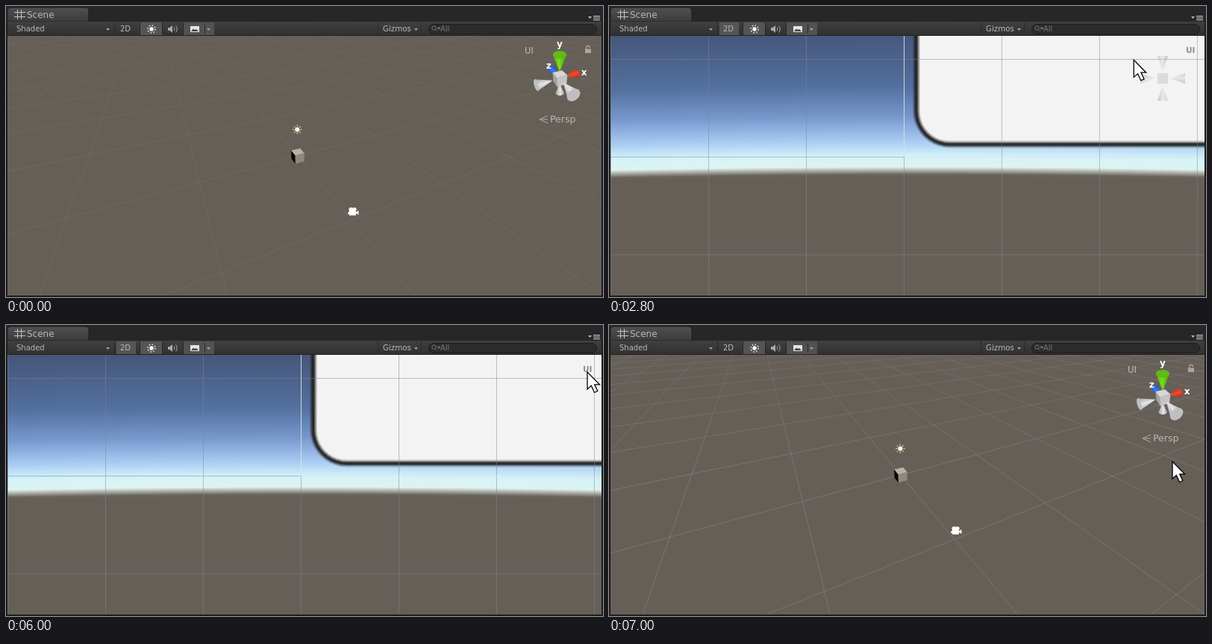
Animation of 800 by 390 pixels, one loop 7.1 s. Source, as an HTML page with a canvas:

```html
<!DOCTYPE html>
<html lang="en">
<head>
<meta charset="utf-8">
<title>Scene view</title>
<style>
html, body { margin: 0; width: 100%; height: 100%; overflow: hidden; background: #1e1e1e; }
#stage { position: relative; width: 800px; height: 390px; overflow: hidden; }
canvas, svg { position: absolute; left: 0; top: 0; display: block; }
text { font-family: "DejaVu Sans", Verdana, sans-serif; font-size: 10px; fill: #b8b8b8; }
.axis { font-size: 12px; font-weight: bold; fill: #fff; text-anchor: middle; }
</style>
</head>
<body>
<div id="stage">
<canvas id="view" width="800" height="390"></canvas>
<svg width="800" height="390" viewBox="0 0 800 390">
  <defs>
    <linearGradient id="bar" x2="0" y2="1"><stop stop-color="#404040"/><stop offset="1" stop-color="#303030"/></linearGradient>
    <linearGradient id="tab" x2="0" y2="1"><stop stop-color="#505050"/><stop offset="1" stop-color="#3c3c3c"/></linearGradient>
  </defs>
  <path d="M0 0H800V390H0ZM2 40V388H798V40Z" fill="#1e1e1e" fill-rule="evenodd"/>
  <rect width="800" height="21" fill="#272727"/>
  <path d="M2 21V6Q2 2 6 2H106Q111 2 111 7V21Z" fill="url(#tab)" stroke="#1c1c1c"/>
  <rect x="2" y="21" width="796" height="19" fill="url(#bar)"/>
  <path d="M2 39.5H798" stroke="#222"/>
  <path d="M15.500 5V18M20.500 5V18M11 8.500H26M11 14.500H26" stroke="#c4c4c4"/>
  <text x="28" y="16" style="font-size:12px">Scene</text>
  <path d="M780 14H785L782.500 17ZM787 13H796V14.300H787ZM787 15.500H796V16.800H787ZM787 18H796V19.300H787Z" fill="#bbb"/>
  <g id="flat"><rect x="148" y="22" width="26" height="17" fill="#555"/></g>
  <rect x="180" y="22" width="29" height="17" fill="#555"/>
  <rect x="238" y="22" width="41" height="17" fill="#525252"/>
  <path d="M145.500 22V39M179.500 22V39M209.500 22V39M237.500 22V39M266.500 24V37M498.500 22V39M556.500 22V39" stroke="#282828"/>
  <text x="14" y="34">Shaded</text>
  <text x="153" y="34">2D</text>
  <text x="505" y="34" style="font-size:10.300px">Gizmos</text>
  <path d="M134 30H139L136.500 33ZM547 30H552L549.500 33ZM269 30H274L271.500 33Z" fill="#a4a4a4"/>
  <circle cx="195" cy="31" r="2.700" fill="#fff"/>
  <circle cx="195" cy="31" r="5" fill="none" stroke="#ddd" stroke-width="1.800" stroke-dasharray="1.500 2.430"/>
  <path d="M217 29H219.500L223 26V36L219.500 33H217Z" fill="#aaa"/>
  <path d="M225 28.500Q227 31 225 33.500M227.500 26.500Q231 31 227.500 35.500" fill="none" stroke="#aaa"/>
  <rect x="247" y="27" width="12" height="8" fill="#e4e4e4"/>
  <path d="M248 34L251 30.500L253 32L255 31L258 34Z" fill="#444"/>
  <rect x="566.500" y="24.500" width="225" height="13" rx="6.500" fill="#2b2b2b" stroke="#1d1d1d"/>
  <circle cx="573.500" cy="29.500" r="2.700" fill="none" stroke="#777"/>
  <path d="M575.500 31.500L578 34M578 29H582L580 31.500Z" fill="#777" stroke="#777" stroke-width=".8"/>
  <text x="582" y="34" style="fill:#777">All</text>

  <text id="ax" class="axis">x</text>
  <text id="ay" class="axis">y</text>
  <text id="az" class="axis">z</text>
  <g id="persp">
    <text x="695" y="64" style="font-size:11.500px;fill:#c0bcb8">UI</text>
    <path d="M777.500 58V56Q778 53.500 780 53.500Q782 53.500 782.500 56" fill="none" stroke="#aaa6a2" stroke-width="1.300"/>
    <rect x="776" y="57.500" width="8" height="5.500" fill="#aaa6a2"/>
    <path d="M726 147L715 152L726 157M715 152H726" fill="none" stroke="#b0aba7"/>
    <text x="729" y="156" style="font-size:12.500px;fill:#bdb8b4">Persp</text>
  </g>
  <text id="ui2d" x="773" y="63" style="font-size:10.500px;font-weight:bold;fill:#8c8c8c">UI</text>
  <path id="cursor" d="M0 0V23L5.300 18.300L9.500 27.500L13.800 25.500L9.700 16.800H16.500Z" fill="#fff" stroke="#000" stroke-width="1.300"/>
</svg>
</div>
<script>
const LOOP = 7100, STEP = 100, SWING = 500, TO_2D = 2440, TO_3D = 6150;
const YAW = 26 * Math.PI / 180, PITCH = 36 * Math.PI / 180, DIST = 27.2;
const ctx = document.getElementById('view').getContext('2d');
const el = id => document.getElementById(id);
const clamp = (v, a = 0, b = 1) => Math.min(b, Math.max(a, v));
const mix = (a, b, p) => a + (b - a) * p;
const easeOut = p => 1 - (1 - clamp(p)) ** 4;

// time, x, y
const cursorPath = [
  [400, 800, 330], [800, 746, 181], [900, 746, 181], [1300, 701, 64], [2700, 701, 63],
  [3400, 742, 233], [4100, 742, 235], [4800, 779, 63], [6700, 779, 63], [7000, 755, 183]
];
// offset from the horizon, colour
const skyStops = [
  [-190, '#445476'], [-110, '#53709f'], [-70, '#7898cd'], [-38, '#a9cbf2'],
  [-18, '#d3f3f9'], [-4, '#dff3ef'], [1, '#a9aba4'], [6, '#6b645e'], [10, '#665f58']
];

let cam;

function setCamera(k) {
  const a = YAW * k, b = PITCH * k;
  cam = {
    k, w: Math.min(1, k * 1.6), s: mix(13.1, 12.6, k),
    c1: Math.cos(a), s1: Math.sin(a), c2: Math.cos(b), s2: Math.sin(b)
  };
}

function turn([x, y, z]) {
  const { c1, s1, c2, s2 } = cam;
  return [x * c1 - z * s1, x * s1 * s2 + y * c2 + z * c1 * s2, x * s1 * c2 - y * s2 + z * c1 * c2];
}

const near = v => 1 + cam.w * turn(v)[2] / DIST;

function toScene(v) {
  const [r, u] = turn(v), m = near(v);
  return [400 + (r * cam.s + mix(-4.5, -9, cam.k)) / m, 214 - (u * cam.s + mix(11.5, 13, cam.k)) / m];
}

function toGizmo(v) {
  const [r, u, d] = turn(v), f = 1 / (1 + cam.w * d / 75);
  return [742 + r * f, 97 - u * f, f, d];
}

function trace(points, close) {
  ctx.beginPath();
  points.forEach(p => ctx.lineTo(p[0], p[1]));
  if (close) ctx.closePath();
}

function line(a, b) {
  const MIN = .06;
  const na = near(a), nb = near(b);
  if (na < MIN && nb < MIN) return;
  const cut = (p, q, np, nq) => np >= MIN ? p : p.map((v, i) => mix(v, q[i], (MIN - np) / (nq - np)));
  trace([toScene(cut(a, b, na, nb)), toScene(cut(b, a, nb, na))]);
  ctx.stroke();
}

function box(project, h, top, side, front) {
  const face = (fill, corners) => {
    trace(corners.map(c => project(c.map(v => v * h))), true);
    ctx.fillStyle = fill;
    ctx.fill();
  };
  face(top, [[-1, 1, -1], [1, 1, -1], [1, 1, 1], [-1, 1, 1]]);
  face(side, [[-1, -1, -1], [-1, 1, -1], [-1, 1, 1], [-1, -1, 1]]);
  face(front, [[-1, -1, -1], [1, -1, -1], [1, 1, -1], [-1, 1, -1]]);
}

function sky() {
  ctx.fillStyle = '#665f58';
  ctx.fillRect(0, 38, 800, 352);
  const k = cam.k;
  if (k === 1) return;
  const mid = 221 - 330 * Math.tan(PITCH * k), stretch = 1 + .6 * Math.min(1, k * 3);
  const left = 4 + 36 * k, right = 4 - 24 * k;
  const lo = -190 * stretch, hi = 10 * stretch;
  const g = ctx.createLinearGradient(0, lo, 0, hi);
  for (const [y, c] of skyStops) g.addColorStop((y + 190) / 200, c);
  ctx.fillStyle = g;
  for (let x = 0; x < 800; x += 4) {
    const q = (x - 400) / 400;
    const y = mid + (left + right) / 2 * q * q + (right - left) / 2 * q;
    ctx.setTransform(1, 0, 0, 1, 0, y);
    ctx.fillRect(x, -400, 4, 400 + hi);
  }
  ctx.setTransform(1, 0, 0, 1, 0, 0);
}

function grids(strength) {
  const k = cam.k;
  ctx.lineWidth = 1;
  if (k > .01) {
    const g = ctx.createLinearGradient(0, 40, 0, 200);
    g.addColorStop(0, 'rgba(145,155,158,.16)');
    g.addColorStop(1, 'rgba(145,155,158,.36)');
    ctx.strokeStyle = g;
    ctx.globalAlpha = k * strength;
    for (let i = -120; i <= 120; i += 10) {
      line([i, 0, -400], [i, 0, 400]);
      line([-400, 0, i], [400, 0, i]);
    }
  }
  if (k < 1) {
    ctx.strokeStyle = 'rgba(122,136,142,.5)';
    ctx.globalAlpha = (1 - k) ** .7;
    for (let i = -60; i <= 60; i += 10) {
      line([i, -60, 0], [i, 60, 0]);
      line([-60, i, 0], [60, i, 0]);
    }
  }
  ctx.globalAlpha = 1;
}

function panel() {
  const R = 3.4, x0 = 1.25, y0 = 1.3;
  const pts = [[x0, 24, 0]];
  for (let i = 0; i <= 10; i++) {
    const a = i / 10 * Math.PI / 2;
    pts.push([x0 + R - R * Math.cos(a), y0 + R - R * Math.sin(a), 0]);
  }
  pts.push([80, y0, 0]);
  const edge = pts.map(toScene);
  trace([...edge, toScene([80, 24, 0])], true);
  ctx.fillStyle = '#f3f3f3';
  ctx.fill();
  trace(edge);
  for (const [w, a] of [[10, .18], [7.5, .3], [5, .5], [2.5, .75]]) {
    ctx.lineWidth = w;
    ctx.strokeStyle = `rgba(30,29,28,${a})`;
    ctx.stroke();
  }
}

function canvasFrame() {
  ctx.lineWidth = 1;
  ctx.strokeStyle = 'rgba(235,240,240,.8)';
  line([0, 0, 0], [0, 24, 0]);
  line([0, 0, 0], [80, 0, 0]);
}

function disc(x, y, r) {
  ctx.beginPath();
  ctx.arc(x, y, r, 0, 7);
  ctx.fill();
}

function objects() {
  box(toScene, .52, '#b9b2a2', '#060504', '#8f887f');
  const [lx, ly] = toScene([0, 3.15, 0]);
  ctx.strokeStyle = '#cfc39c';
  ctx.lineWidth = 1.2;
  for (let i = 0; i < 8; i++) {
    const c = Math.cos(i * Math.PI / 4), s = Math.sin(i * Math.PI / 4);
    trace([[lx + c * 4, ly + s * 4], [lx + c * 6.3, ly + s * 6.3]]);
    ctx.stroke();
  }
  ctx.fillStyle = '#8b8064';
  disc(lx, ly, 4.2);
  ctx.fillStyle = '#fffbe6';
  disc(lx, ly, 2.9);

  const [cx, cy] = toScene([0, .95, -10]);
  ctx.save();
  ctx.translate(cx, cy);
  ctx.scale(mix(.75, 1, cam.k), mix(.75, 1, cam.k));
  ctx.fillStyle = '#fff';
  disc(-2.5, -2.5, 3);
  disc(2, -3, 2.7);
  ctx.fillRect(-5, -1, 9, 6);
  trace([[3, 1.5], [7.5, -1.5], [7.5, 4.5]], true);
  ctx.fill();
  disc(-5.3, 2, 1.6);
  ctx.restore();
}

function cone(dir, rgb) {
  const [ax, ay] = toGizmo(dir.map(v => v * 10));
  const [bx, by, f, d] = toGizmo(dir.map(v => v * 30));
  const [r, u] = turn(dir);
  const ang = Math.atan2(-u, r), R = 7 * f;
  const nx = -Math.sin(ang) * R, ny = Math.cos(ang) * R;
  const sat = Math.min(1, cam.k * 1.7);
  const tone = q => `rgb(${rgb.map(c => Math.round(clamp(mix(200, c, sat) * q, 0, 255)))})`;
  const g = ctx.createLinearGradient(bx - nx, by - ny, bx + nx, by + ny);
  g.addColorStop(0, tone(.85));
  g.addColorStop(.45, tone(1.12));
  g.addColorStop(1, tone(.75));
  const base = () => {
    ctx.beginPath();
    ctx.ellipse(bx, by, R * Math.abs(d) / 30, R, ang, 0, 7);
    ctx.fill();
  };
  ctx.fillStyle = g;
  trace([[ax, ay], [bx + nx, by + ny], [bx - nx, by - ny]], true);
  ctx.fill();
  if (d > 0) return base();
  ctx.fillStyle = tone(.93);
  base();
}

function gizmo(fade) {
  if (!fade) return;
  const grey = [205, 205, 207], k = cam.k;
  const parts = [
    [[1, 0, 0], [232, 62, 34]], [[-1, 0, 0], grey], [[0, 1, 0], [104, 200, 24]],
    [[0, -1, 0], grey], [[0, 0, 1], [48, 108, 226]], [[0, 0, -1], grey], [[0, 0, 0]]
  ];
  const depth = p => turn(p[0])[2];
  parts.sort((a, b) => depth(b) - depth(a));
  const alpha = mix(.5, 1, Math.min(1, k * 1.4)) * fade;
  for (const [dir, rgb] of parts) {
    ctx.globalAlpha = alpha * (dir[2] ? Math.min(1, k * 1.8) : 1);
    if (rgb) cone(dir, rgb);
    else box(toGizmo, 7, '#d6d6d6', '#a4a4a6', '#c4c4c5');
  }
  ctx.globalAlpha = 1;
}

function labels() {
  const k = cam.k;
  const axes = { ax: [44, 0, 0], ay: [0, 40, 0], az: [0, 0, 50] };
  for (const id in axes) {
    const [x, y] = toGizmo(axes[id]), t = el(id);
    t.setAttribute('x', x);
    t.setAttribute('y', y + 5);
    t.style.opacity = clamp((k - .6) / .4);
  }
  el('persp').style.opacity = clamp(k * 1.2 - .2);
  el('ui2d').style.opacity = (1 - k) ** 3;
}

function cursor(t) {
  const c = el('cursor'), path = cursorPath;
  c.style.display = t < path[0][0] ? 'none' : '';
  let i = path.findIndex(p => p[0] > t);
  if (i === 0) return;
  if (i < 0) i = path.length - 1;
  const [t0, x0, y0] = path[i - 1], [t1, x1, y1] = path[i];
  const q = clamp((t - t0) / (t1 - t0)), p = q * q * (3 - 2 * q);
  c.setAttribute('transform', `translate(${mix(x0, x1, p)} ${mix(y0, y1, p)})`);
}

function draw(t) {
  const flat = t >= TO_2D && t < TO_3D;
  setCamera(1 - easeOut((t - TO_2D) / SWING) + easeOut((t - TO_3D) / SWING));
  ctx.clearRect(0, 0, 800, 390);
  sky();
  if (flat) panel();
  grids(mix(.4, 1, clamp(t / 800)));
  if (flat) canvasFrame();
  else objects();
  gizmo(flat ? 1 - clamp((t - 3700) / 600) : 1);
  labels();
  cursor(t);
  el('flat').style.display = flat ? '' : 'none';
}

const start = performance.now();
let shown = -1;
function tick() {
  const t = Math.floor((performance.now() - start) % LOOP / STEP) * STEP;
  if (t !== shown) draw(shown = t);
  requestAnimationFrame(tick);
}
tick();
</script>
</body>
</html>
```
